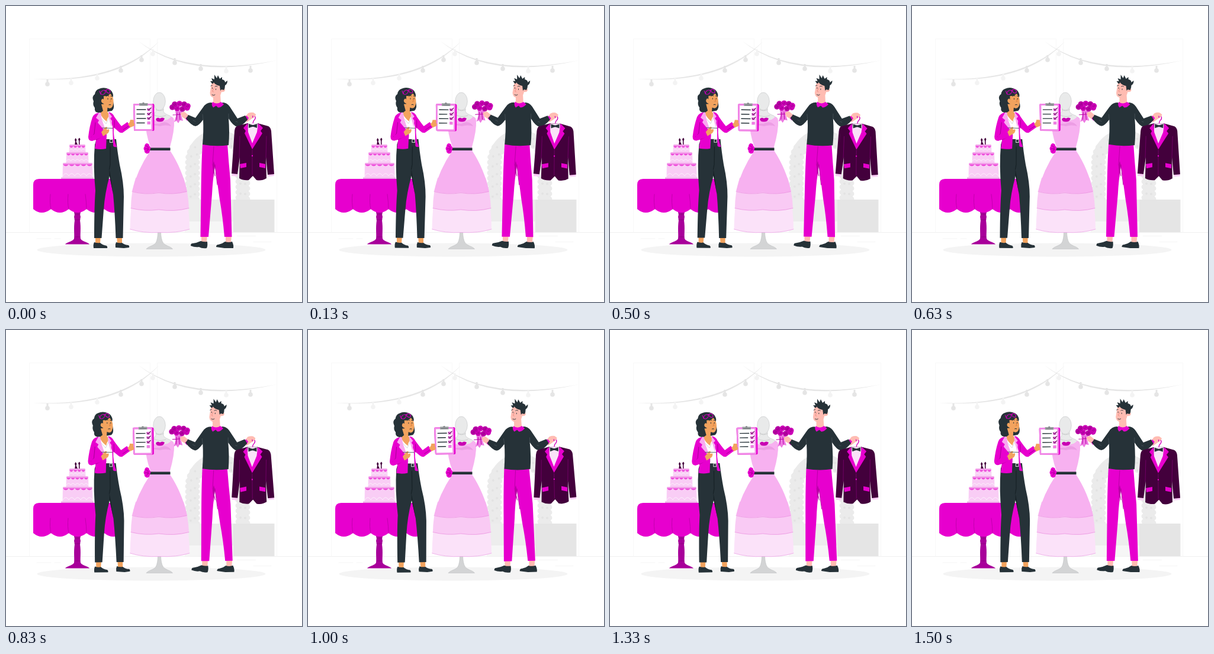
Animation, 500 px wide and 500 px high, one loop 1540 ms. Source, as an HTML page:

```html
<!DOCTYPE html>
<html lang="en">
<head>
<meta charset="utf-8">
<title>Wedding planning</title>
<style>
html, body { margin: 0; width: 100%; height: 100%; overflow: hidden; background: #fff; }
svg { display: block; width: 100vw; height: 100vh; }
.ink { fill: #263238; }
.pink { fill: #e700ce; }
.deep { fill: #b900a6; }
.plum { fill: #43003c; }
.pale { fill: #f9cdf5; }
.tan { fill: #f2a35e; }
.rose { fill: #ffbcb2; }
.line { fill: none; stroke-linecap: round; stroke-linejoin: round; }
</style>
</head>
<body>
<svg viewBox="0 0 500 500">
  <g id="room">
    <path class="line" stroke="#f8f8f8" d="M39.500 382V55.500H243.500V382M255.500 382V55.500H457.500V382"/>
    <path class="line" stroke="#f0f0f0" d="M0 382.500H500"/>
    <path class="line" stroke="#f5f5f5" d="M390 388.500h32M418 398.500h30M52 393h24M82 393h10"/>
    <path fill="#e6e6e6" d="M45 123Q188 129 258 60Q192 133 45 123ZM223 59Q306 121 457 92Q306 126 223 59Z"/>
    <g id="bulbs"></g>
    <g class="line" stroke="#ebebeb">
      <path stroke-width="20" d="M315 327V262A42.500 43 0 0 1 400 262V327"/>
      <path stroke-width="9" stroke-dasharray="0 9" d="M307 327V262A50.500 45 0 0 1 408 262V327M323 327V262A34.500 34 0 0 1 392 262V327"/>
      <path stroke="#e3e3e3" stroke-width="4" stroke-dasharray="0 17" d="M312 322V262A46 43 0 0 1 404 262V327M319 318V262A39 39 0 0 1 396 262V327"/>
    </g>
    <path fill="#ededed" d="M308 327H398V364H308Z"/>
    <path fill="#f6f6f6" d="M302 364H398V382H302Z"/>
    <path fill="#e5e5e5" d="M384 327H453.500V382H384Z"/>
    <ellipse cx="245.500" cy="412" rx="193" ry="11.500" fill="#f4f4f4"/>
  </g>

  <g id="table">
    <path fill="#a8009a" d="M116 345h10v4l-1 3 1 4-1 6c2 14 0 24 1 31 2 5 13 6 15 9.500H100c2-3.500 13-4.500 15-9.500 1-7-1-17 1-31l-1-6 1-4-1-3Z"/>
    <path class="line" stroke="#850079" stroke-width=".7" d="M116 352h9M116 361h9M117 390h8"/>
    <path class="pink" d="M56 292H186Q196 292 196 302V343Q181 355 166 343Q151 355 136 343Q121 355 106 343Q91 355 76 343Q60 355 46 343V302Q46 292 56 292Z"/>
    <path class="line" stroke="#b900a6" stroke-width=".8" d="M75 318q-1.500 14 1 25M105 318q-1.500 14 1 25M134 318q2 14 2 25M165 318q-1.500 14 1 25"/>
  </g>

  <g id="cake">
    <path fill="#edb0e7" d="M93 289.500h55v2.500H93Z"/>
    <path class="plum" d="M116 235l1-6-1-3 1.500-3 2 3-1 3 3 6ZM123 235v-7l-1-3 2-2.500 1.500 2.500-1 3v7Z"/>
  </g>

  <g id="dress">
    <path fill="#d3d4d5" stroke="#b9bbbc" stroke-width=".5" d="M256.500 380h5q0 14 4 20c3 5 13 6 16 10.500H237c3-4.500 13-5.500 16-10.500q3.500-6 3.500-20Z"/>
    <g fill="#e9eaea" stroke="#c3c5c6" stroke-width=".6">
      <path d="M253 170h13v8q1 4 10 7l7 5-7 12h-34l-7-12 8-5q9-3 10-7Z"/>
      <ellipse cx="259" cy="161" rx="10.300" ry="15"/>
    </g>
    <path class="line" stroke="#c5c6c6" stroke-width=".8" d="M253 175q6 4 13 0M250 184q9 5 20 1"/>
    <path fill="#fbe2f9" d="M215 310Q210 345 209.500 377Q232 384 259 382.500Q288 384 310 377Q310 345 303 310Z"/>
    <path fill="#f9caf4" d="M219 290Q211 316 211 341.500Q234 347.500 258 344Q288 348.500 309 341.500Q308 316 300 290Z"/>
    <path fill="#f7b1f0" d="M236 193q1-5 5-6 9 9 19 5 11 4 19-5 4 1 5 6 1 17-7 45v6q21 32 29 69.500-26 6-48 1-23 5-45-2 8-34.500 31-68.500v-6q-9-24-8-45Z"/>
    <path class="line" stroke="#ea8fdf" stroke-width=".7" d="M213 313.500q22 6 45 2 24 4 47-2M211 341.500q24 6 47 2.500 26 4 51-2.500"/>
    <path class="line" stroke="#e99de2" stroke-width=".7" d="M209.500 377q22 7 49.500 5.500 29 1.500 51-5.500"/>
    <path fill="#ec9de4" d="M241 203q8-5 18-4 13-7 20 4-9-3-19 0-12-3-19 0Z"/>
    <path fill="#c900b3" d="M253 191q3-4 7-1 4-3 8 0-2 6-8 5.500-6 .5-7-4.500Z"/>
    <path class="ink" d="M243 239.500h34.500v4.500H243Z"/>
    <path class="pink" d="M237 232q5 0 5 4 4 4 1 8 0 5-5 5.500-5-2-4-5-3-4 0-7 0-4 3-5.500Z"/>
    <path class="line" stroke="#9b008b" stroke-width=".8" d="M236 236q5 1 4 5t-3 5M235 241q4-1 7 2"/>
  </g>

  <g id="woman">
    <path class="tan" d="M151 388h9l-1 13h-8ZM187 388h9v13h-8Z"/>
    <path class="ink" d="M149 399q5 2 10 1 4 4 11 5 2 2 1 4H148q-1-6 1-10ZM186 399q5 2 10 1 5 4 11 4 2 2 1 4l-9 1-14-1q-1-5 1-9Z"/>
    <path class="ink" d="M150 234L153 225H186Q188 245 192 268Q199 298 199 322L197.500 392H185.500Q184 350 181 318L175 287Q167 316 165 344L161.500 392H149Q149 340 151 312Q147 270 150 234Z"/>
    <path fill="#10191d" d="M174.500 275l6.500 43-6-31Z"/>
    <path class="line" stroke="#10191d" stroke-width=".8" d="M176 238v30l-1.500 8"/>
    <path class="line" stroke="#4c575d" stroke-width=".7" d="M155 238q8-1 11-7"/>
    <path fill="#fff" d="M158 181l20-1 3 46h-22Z"/>
    <path class="line" stroke="#cfd2d4" stroke-width=".8" d="M161 190l8 9 6-12M168 204l2 18"/>
    <path class="ink" d="M160 225h24v5h-24Z"/>
    <path fill="none" stroke="#ddd" d="M175.500 225.500h4.500v5h-4.500Z"/>
    <path class="ink" d="M157 140q6-3 13-1 8 2 10 8 2 4 0 8l2 12q1 6-3 10l-11 2q-6 4-13 1-6-1-5-8-4-5-2-11-4-8 2-12 1-7 7-9Z"/>
    <path class="tan" d="M161 166l11-1-1 13 4 7q-4 4-5 10-8-6-11-14l5-4Z"/>
    <path class="tan" d="M165 152q7 1 11-4 6 6 5.500 14-.5 11-6.500 11-8-2-10-8-5-2-4-6 2-4 4-1Z"/>
    <path class="line" stroke="#263238" stroke-width="1" d="M169.500 152.500q2-2 4-.5M177 152l2 .5M172 156v1.500M178 156v1.500M174 167q2-1 3 0"/>
    <path class="line" stroke="#d77c3b" stroke-width=".9" d="M176 157l1.500 4-2 .5"/>
    <g class="line" stroke="#c500b2" stroke-width="1.200">
      <ellipse cx="164" cy="146" rx="4.400" ry="3" transform="rotate(-38 164 146)"/>
      <ellipse cx="172.500" cy="144" rx="3.600" ry="2.700" transform="rotate(40 172.500 144)"/>
      <path d="M167 143l2-1M160 149l-2-5"/>
    </g>
    <path class="pink" d="M158 180q-9 1-12 8-5 15-7 33 0 7 6 7l7-2-2 15q10 2 19 0l1-24-10-27ZM173 179q7 1 10 8 7 10 12 16l10-7 6 8-14 10q-4 1-7-2l-8-7q-1 18 5 33-7 1-6-4l-1-30-7-25Z"/>
    <path fill="#f9a8f1" d="M157 180l-5 9 5 4-2 4 15 18-8-23-2-12ZM173 179l6 8-3 3 3 4-1 12-5-20Z"/>
    <path class="line" stroke="#9e008e" stroke-width=".9" d="M151 197l-2 19-5 5M152 226l10-5M183 193v13M198 209l9-6"/>
    <path class="pink" d="M144 219l17-7 4 9-20 7Z"/>
    <path class="tan" d="M161 213l5-6q3-4 5-2l-1 4 4-1q1 4-2 7l-8 5ZM206 200l3-4 1-4 6 1 1 9-7 3Z"/>
    <path class="line" stroke="#4c575d" stroke-width=".9" d="M162 206l18 .5"/>
    <path class="pink" d="M217 165h31q2 0 2.500 2v42q0 2-2 2H218q-2 0-2-2l-1-42q0-2 2-2Z"/>
    <path fill="#f18ae7" d="M217 165h29q2 0 2 2v42q0 2-2 2h-28q-2 0-2-2l-1-42q0-2 2-2Z"/>
    <path fill="#fff" d="M218 168h27.500v40H218.500Z"/>
    <path fill="#9b9fa1" d="M225 164h5q2-3 4 0h5.500v4.500H225Z"/>
    <path class="line" stroke="#5b6265" stroke-width=".7" d="M227 167h11M231 164.500h2"/>
    <g id="list"></g>
    <path class="tan" d="M210 194q3-3 6-1v4h-4l5 1v4l-7 3Z"/>
  </g>

  <g id="man">
    <path class="rose" d="M330 386h10l-1 13h-9ZM371 387h10l-1 13h-9Z"/>
    <path class="ink" d="M329 397q6 2 11 1 1 7-1 11-8 1-13-2-7 1-14-2 0-4 3-4 8-1 14-4ZM370 398q6 2 12 0 3 6 2 11h-15l-14-2q0-4 4-4 6-1 11-5Z"/>
    <path class="pink" d="M332 233H374Q376 262 379 294L381.500 390H369Q366 355 361 327L353 270Q349 295 348 318L342 390H328.500L329.500 315Q330 265 332 233Z"/>
    <path class="line" stroke="#b900a6" stroke-width="1" d="M351 237l-2 31 4 19M353 268l4 34"/>
    <path class="deep" d="M351 262l2 8-3 20-1-21Z"/>
    <path class="rose" d="M350 148h12l1 17q-7 7-15 1l2-5Z"/>
    <path class="rose" d="M347 131q10-5 17 1l1 7q5-2 5 3-1 4-6 3-2 11-11 10-8 0-8.500-8Z"/>
    <path class="ink" d="M348 131l-3-4 4 0-2-5 5 2 0-8 4 6 2-5 3 6 4-3v4q5 1 5 5l4-3q0 6-4 8 0 5-2 8l-4-1-2 2-1-8q-8-2-10-6-1 3-3 2Z"/>
    <path class="line" stroke="#263238" stroke-width=".9" d="M346 135l2.500-1M353 136q2-2 4 0M348.500 138v1.500M354.500 140v1.500M348 150q3 2 5 0"/>
    <path class="line" stroke="#e9857d" stroke-width=".8" d="M351 139l-2.500 5 2 1"/>
    <path class="rose" d="M303 191l-6-4-1-6q4-4 7-1l6 5ZM402 190l7-9q5-2 9-1l4 3-2 4-7 5-6 4Z"/>
    <path class="pink" d="M303 190l3-5 4 3-4 6ZM402 190l4-5 4 4-3 5Z"/>
    <path class="ink" d="M347 163Q356 173 366 163Q373 163 378 170L391 190L404 185L408 192Q399 203 391 204Q384 203 376 190Q378 213 376 235Q354 238 332 234Q334 211 333 192Q325 203 320 203Q313 202 304 190L308 184L320 189L333 171Q338 163 347 163Z"/>
    <path class="line" stroke="#4c575d" stroke-width=".7" d="M333 193l-1-10M376 190v-8M316 193l4 2M391 196l-3-1"/>
    <path class="pink" d="M349 162q7 5 14 0l5 4q-5 6-10 5.500l-3-3-5 3q-4-5-1-9.500Z"/>

    <g id="bouquet">
      <path fill="#ed79e2" d="M286 176l12 1-2 8 3 9-5-1-3 5-3-4-4 2 3-10Z"/>
      <path class="line" stroke="#b900a6" stroke-width="1" d="M289 180l-1 12M293 180l1 12M282 184l14-1"/>
      <g id="blooms"></g>
      <path class="rose" d="M295 181q4-3 8 0l4 5-4 4-6-3 3-3h-5Z"/>
    </g>

    <g id="tuxedo">
      <path class="line" stroke="#d300bd" stroke-width="1.400" d="M417 201q0-7 3-9 3-4-1-7-3-1-2 3"/>
      <path class="pale" d="M382 282l9 2v4l-10-1ZM443 284l9-2 1 5-10 1Z"/>
      <path class="plum" d="M408 198l17 0 18 5q4 2 5 8l5 73-11 1-3-30 1 36q-8 5-17 3l-6-7-7 7q-9 1-16-3l1-36-4 29-10-1 5-72q1-7 4-8Z"/>
      <path fill="#fae1f8" d="M409 198h16l1 14-10 23-8-23Z"/>
      <path class="pink" d="M408 198l-7 8 4 5-2 4 13 27V232l-7-19ZM426 198l8 8-4 5 3 4-17 27V232l8-19Z"/>
      <path class="ink" d="M410 199l6 2h2l6-2v7l-6-2h-2l-6 2Z"/>
      <path class="pink" d="M395 267l11-2v7l-10 2ZM428 265l10 2v7l-10-2Z"/>
      <path class="line" stroke="#7a006e" stroke-width=".8" d="M395 220l-1 36M440 220l-1 36M416 243v42"/>
      <circle cx="416" cy="253" r="1.200" class="pink"/>
    </g>
    <path class="rose" d="M409 184q5-5 10-3l3 3-2 3-4-2-4 4Z"/>
  </g>
</svg>
<script>
const $ = id => document.getElementById(id);
const circle = (x, y, r, fill) => `<circle cx="${x}" cy="${y}" r="${r}" fill="${fill}"/>`;

const bulbs = [[70, 132, 1], [110, 130, 0], [154, 122, 0], [194, 109, 1], [229, 91, 1],
  [248, 81, 0], [285, 96, 1], [329, 106, 1], [372, 110, 0], [413, 109, 1]];
$('bulbs').innerHTML = bulbs.map(([x, y, dark]) => {
  const color = dark ? '#e5e5e5' : '#f3f3f3';
  return `<path fill="${color}" d="M${x - 1.5} ${y - 8}h3v6h-3Z"/>` + circle(x, y, 3.8, color);
}).join('');

const tier = (x, y, w, h, n) => {
  const step = w / n;
  const scallops = `q${-step / 2} 6 ${-step} 0`.repeat(n);
  const swirl = `q${step / 2} ${-h / 3} ${step} 0`.repeat(n);
  return `<path class="pale" d="M${x} ${y}h${w}l.5 ${h}h${-w - 1}Z"/>
    <path fill="#f3a3ea" d="M${x + 1} ${y}h${w - 2}l1 3h${-w}Z"/>
    <path fill="#ee4bdb" d="M${x + w} ${y + 2.5}${scallops}Z"/>
    <path class="line" stroke="#fdeffc" d="M${x} ${y + h - 3}${swirl}"/>`;
};
$('cake').innerHTML += tier(96, 265, 50, 25, 5) + tier(102, 247, 37, 18, 5) + tier(107, 234, 27, 13, 4);

$('list').innerHTML = [175, 182.5, 190, 197.5].map((y, i) =>
  `<path class="line" stroke="#263238" stroke-width="1.4" d="M221 ${y}h${i % 2 ? 13 : 15}"/>
  <path fill="#ee7ee3" d="M238.500 ${y - 2.5}h5.500v5h-5.500Z"/>` +
  (i < 3 ? `<path class="line" stroke="#5f1457" stroke-width="1.1" d="M239 ${y - 1}l2 2 4-4"/>` : '')).join('');

const blooms = [[281, 171], [289, 173], [298, 174], [306, 172], [285, 166], [293, 165], [301, 166], [307, 169]];
$('blooms').innerHTML = blooms.map(([x, y], i) =>
  circle(x, y, 4.8, i % 2 ? '#cc00b7' : '#b900a6') +
  `<path class="line" stroke="#86007a" stroke-width=".7" d="M${x - 3} ${y}q2 3 5 0q-1-3-3-1"/>`).join('');

const LOOP = 1540;
const sway = t => Math.sin(2 * Math.PI * (t + 40) / LOOP);
const rest = sway(0);

function draw(now) {
  const angle = sway(now % LOOP) - rest;
  $('woman').setAttribute('transform', `rotate(${angle} 194.5 274)`);
  $('man').setAttribute('transform', `rotate(${angle} 364.5 262.5)`);
  requestAnimationFrame(draw);
}
draw(performance.now());
</script>
</body>
</html>
```
